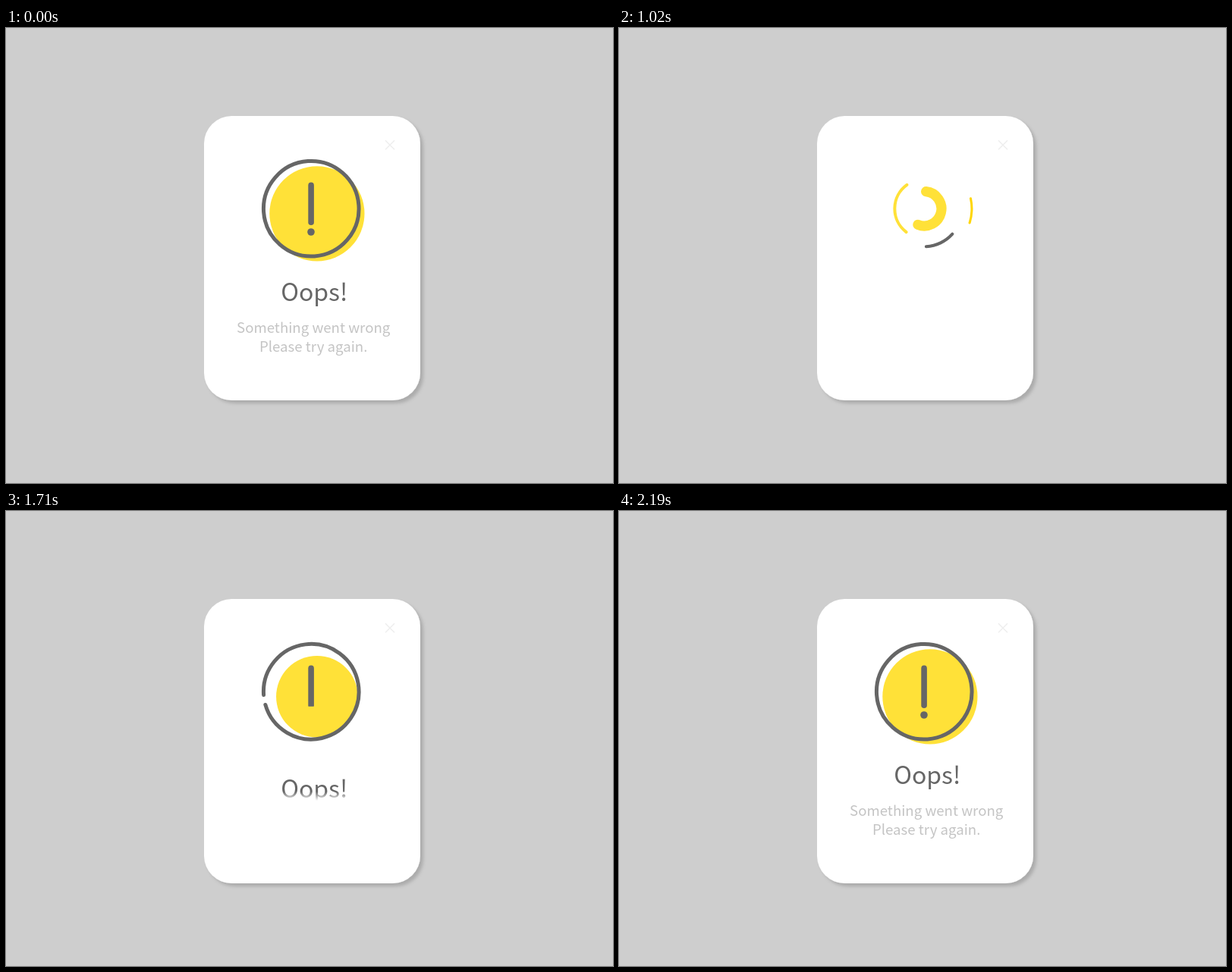
An HTML page that plays this animation: 800x600 px, repeating every 3.39 s.

```html
<!DOCTYPE html>
<html lang="en">
<head>
<meta charset="utf-8">
<title>Error card</title>
<style>
  html, body { margin: 0; width: 100%; height: 100%; overflow: hidden; background: #cecece; }
  svg { display: block; width: 100%; height: 100%; }
  text { font-family: "Noto Sans CJK JP", "Noto Sans CJK SC", "Noto Sans CJK", "Noto Sans", sans-serif; text-anchor: middle; }
  .line { fill: none; stroke-linecap: round; }
</style>
</head>
<body>
<svg viewBox="0 0 800 600">
  <defs>
    <filter id="shadow" x="-10%" y="-10%" width="120%" height="120%">
      <feDropShadow dx="4" dy="4" stdDeviation="2" flood-color="#000" flood-opacity=".17"/>
    </filter>
    <linearGradient id="titleFade" gradientUnits="userSpaceOnUse" x1="0" y1="370" x2="0" y2="382">
      <stop stop-color="#fff"/><stop offset="1" stop-color="#000"/>
    </linearGradient>
    <linearGradient id="noteFade" gradientUnits="userSpaceOnUse" x1="0" y1="434" x2="0" y2="449">
      <stop stop-color="#fff"/><stop offset="1" stop-color="#000"/>
    </linearGradient>
    <mask id="titleMask" maskUnits="userSpaceOnUse" x="261" y="300" width="285" height="190">
      <rect x="261" y="300" width="285" height="190" fill="url(#titleFade)"/>
    </mask>
    <mask id="noteMask" maskUnits="userSpaceOnUse" x="261" y="300" width="285" height="190">
      <rect x="261" y="300" width="285" height="190" fill="url(#noteFade)"/>
    </mask>
    <clipPath id="barClip"><rect id="barRect" x="390" y="203" width="24" height="60"/></clipPath>
  </defs>

  <rect width="800" height="600" fill="#cecece"/>
  <rect x="261" y="116" width="285" height="375" rx="36.5" fill="#fff" filter="url(#shadow)"/>
  <path d="M500 148.2 512 160.2M512 148.2 500 160.2" stroke="#eee" stroke-width="1.5"/>

  <g id="arcs"></g>

  <circle id="disc" cx="409.9" cy="244.8" fill="#ffe138"/>
  <path id="ring" class="line" stroke="#666" stroke-width="5"/>
  <circle id="dot" cx="402" r="4.8" fill="#666"/>
  <path id="drip" class="line" stroke="#777" stroke-width="1.8"/>
  <path class="line" d="M402.1 207.4V256.2" stroke="#666" stroke-width="7.6" clip-path="url(#barClip)"/>

  <g mask="url(#titleMask)">
    <text id="title" x="406.3" y="360" font-size="32" fill="#666">Oops!</text>
  </g>
  <g mask="url(#noteMask)">
    <g id="note" font-size="18.65" fill="#c4c4c4">
      <text x="405.2" y="402.3">Something went wrong</text>
      <text x="405.2" y="427.3">Please try again.</text>
    </g>
  </g>
</svg>
<script>
const LOOP = 3390, START = 540, STEP = 30, END = 2190;
const CX = 402.25, CY = 238.25;
const $ = id => document.getElementById(id);
const clamp = v => Math.max(0, Math.min(1, v));
const show = (el, on) => el.setAttribute("display", on ? "inline" : "none");

// keys: [time, tail angle, head angle], clockwise from the top
const arcs = [
  { r: 62.7, width: 3, color: "#ffd600", keys: [[600, 0, 0], [840, 0, 53.4], [1200, 155, 161.5], [1230, 165, 165]] },
  { r: 50, width: 4, color: "#666", keys: [[540, -90, -90], [840, 53, 91], [1200, 211, 263], [1500, 360, 360]] },
  { r: 38.9, width: 4, color: "#ffe138", keys: [[750, 100, 100], [840, 144, 174], [1200, 291, 474], [1530, 600, 600]] },
  { r: 22.7, width: 13.2, color: "#ffe138", keys: [[630, -30, -30], [840, -11, 99], [1200, 23, 304], [1380, 120, 380], [1560, 400, 400]] }
];
const dotKeys = [[1800, 255], [1920, 277], [1980, 274], [2070, 269]];
const dripKeys = [[1800, 256], [1920, 275], [1980, 264], [2010, 258]];

for (const arc of arcs) {
  arc.el = document.createElementNS("http://www.w3.org/2000/svg", "path");
  arc.el.setAttribute("class", "line");
  arc.el.setAttribute("stroke", arc.color);
  arc.el.setAttribute("stroke-width", arc.width);
  $("arcs").append(arc.el);
}

function sample(keys, t, col = 1) {
  if (t <= keys[0][0]) return keys[0][col];
  for (let i = 1; i < keys.length; i++) {
    const a = keys[i - 1], b = keys[i];
    if (t <= b[0]) return a[col] + (b[col] - a[col]) * (t - a[0]) / (b[0] - a[0]);
  }
  return keys[keys.length - 1][col];
}

function point(r, deg) {
  const a = deg * Math.PI / 180;
  return `${(CX + r * Math.sin(a)).toFixed(2)} ${(CY - r * Math.cos(a)).toFixed(2)}`;
}

function drawArc(el, r, from, to) {
  const sweep = Math.min(to - from, 360);
  show(el, sweep > 0.5);
  const mid = from + sweep / 2;
  const seg = deg => `A${r} ${r} 0 0 1 ${point(r, deg)}`;
  el.setAttribute("d", `M${point(r, from)}${seg(mid)}${seg(from + sweep)}`);
}

const easeInOut = p => p < 0.5 ? 4 * p ** 3 : 1 - 4 * (1 - p) ** 3;
const easeOut = (p, n) => 1 - (1 - p) ** n;

// Text offset that settles to zero at `end`, passing `y` when `left` ms remain
const settle = (t, end, left, y) => y * (Math.max(0, end - t) / left) ** 1.5;

function draw(t) {
  for (const { el, r, keys } of arcs) drawArc(el, r, sample(keys, t, 1), sample(keys, t, 2));

  drawArc($("ring"), 62.8, 266, 266 + 360 * easeInOut(clamp((t - 1327) / 480)));
  $("disc").setAttribute("r", 62.6 * easeOut(clamp((t - 1560) / 312), 3));

  $("barRect").setAttribute("height", 58.5 * easeOut(clamp((t - 1620) / 120), 2));
  show($("dot"), t > 1800);
  $("dot").setAttribute("cy", sample(dotKeys, t));
  show($("drip"), t > 1800 && t < 2010);
  $("drip").setAttribute("d", `M402.6 255V${sample(dripKeys, t)}`);

  $("title").setAttribute("transform", `translate(0 ${settle(t, 1880, 170, 18)})`);
  $("note").setAttribute("transform", `translate(0 ${settle(t, END, 210, 22)})`);
}

const origin = performance.now();
function tick() {
  const t = (performance.now() - origin) % LOOP;
  const step = Math.floor(t / STEP) * STEP;
  draw(step < START ? END : Math.min(step, END));
  requestAnimationFrame(tick);
}
tick();
</script>
</body>
</html>
```
